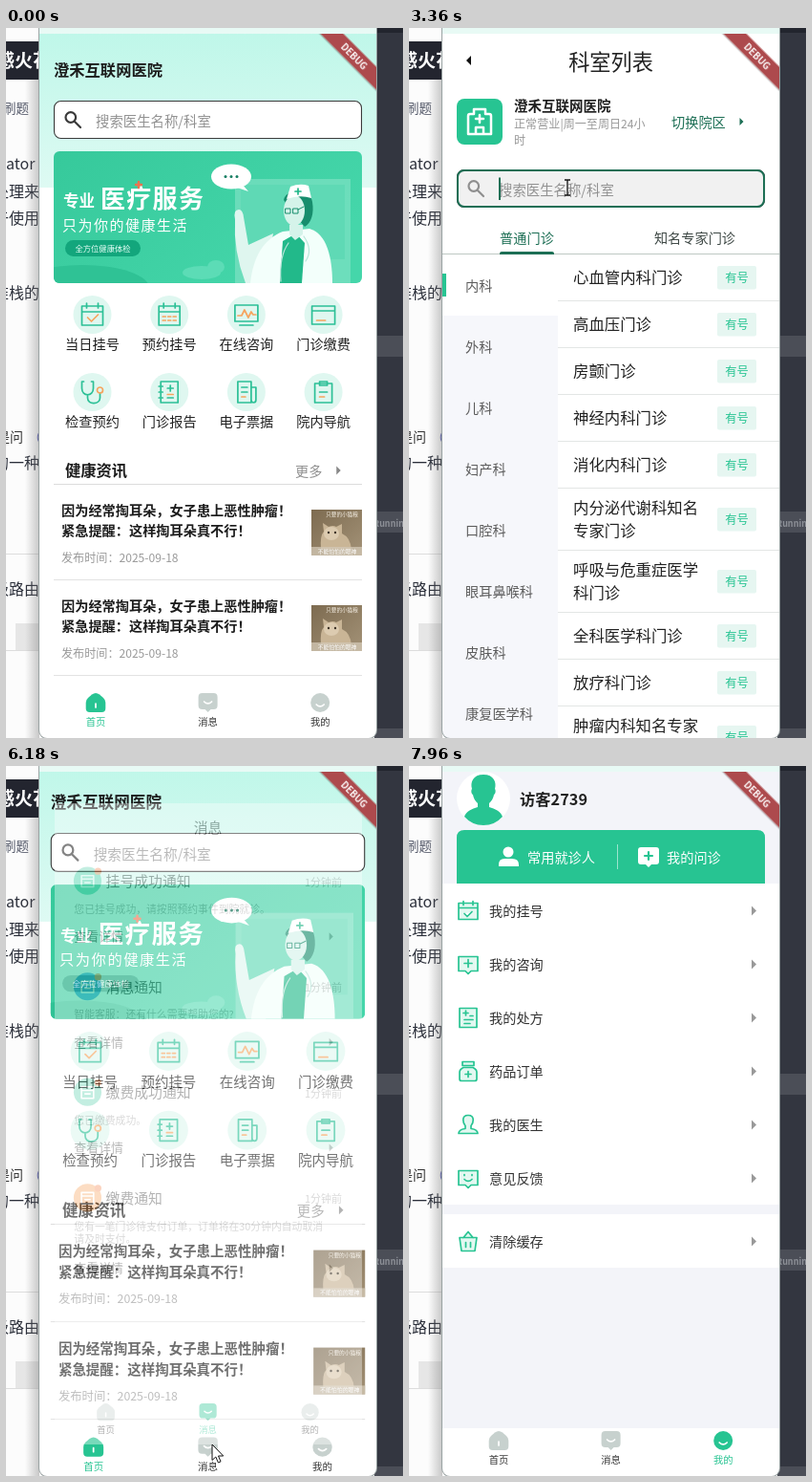
These frames come from a looping animation (416x743 px, 8 s). An HTML page:

```html
<!DOCTYPE html>
<html lang="zh-CN">
<head>
<meta charset="utf-8">
<title>互联网医院</title>
<style>
html, body { margin: 0; width: 100%; height: 100%; overflow: hidden; background: #fff; }
svg { display: block; width: 416px; height: 743px; font-family: "Noto Sans CJK SC", "Noto Sans CJK", "Noto Sans", sans-serif; }
:root { --in: cubic-bezier(.3, 0, .8, .15); --out: cubic-bezier(.05, .7, .1, 1); }
.page { transform-origin: 211.5px 374.5px; }
.page, .mouse, .step { animation-duration: 8s; animation-iteration-count: infinite; animation-timing-function: linear; }
.step { animation-timing-function: step-end; }
.ico { fill: none; stroke-width: 1.7; stroke-linejoin: round; stroke-linecap: round; }

#home { animation-name: home-zoom; }
#dept { animation-name: dept-zoom, dept-fade; }
#msg { animation-name: msg-zoom, msg-fade; }
#mine { animation-name: mine-zoom, mine-fade; }

@keyframes home-zoom {
  0%, 23.5% { transform: scale(1); animation-timing-function: var(--in); }
  25.35% { transform: scale(1.02); animation-timing-function: var(--out); }
  34.62%, 60.87% { transform: scale(1.05); }
  60.88% { transform: scale(1.1); animation-timing-function: var(--in); }
  61.91% { transform: scale(1.06); animation-timing-function: var(--out); }
  67.13%, 75.73% { transform: scale(1); animation-timing-function: var(--in); }
  77.29% { transform: scale(1.02); animation-timing-function: var(--out); }
  85.1%, 100% { transform: scale(1.05); }
}
@keyframes dept-zoom {
  0%, 23.5% { transform: scale(.85); animation-timing-function: var(--in); }
  25.35% { transform: scale(.91); animation-timing-function: var(--out); }
  34.62%, 60.88% { transform: scale(1); animation-timing-function: var(--in); }
  61.91% { transform: scale(.96); animation-timing-function: var(--out); }
  67.13%, 100% { transform: scale(.9); }
}
@keyframes dept-fade {
  0%, 25.06% { opacity: 0; }
  25.77%, 61.39% { opacity: 1; }
  62.17%, 100% { opacity: 0; }
}
@keyframes msg-zoom {
  0%, 75.73% { transform: scale(.85); animation-timing-function: var(--in); }
  77.29% { transform: scale(.91); animation-timing-function: var(--out); }
  85.1%, 87.68% { transform: scale(1); animation-timing-function: var(--in); }
  89.14% { transform: scale(1.02); animation-timing-function: var(--out); }
  96.43%, 100% { transform: scale(1.05); }
}
@keyframes msg-fade { 0%, 77.03% { opacity: 0; } 77.65%, 100% { opacity: 1; } }
@keyframes mine-zoom {
  0%, 87.68% { transform: scale(.85); animation-timing-function: var(--in); }
  89.14% { transform: scale(.91); animation-timing-function: var(--out); }
  96.43%, 100% { transform: scale(1); }
}
@keyframes mine-fade { 0%, 88.9% { opacity: 0; } 89.45%, 100% { opacity: 1; } }

.mouse { animation-name: mouse; animation-timing-function: ease-in-out; }
@keyframes mouse {
  0%, 2.25% { transform: translate(230px, 748px); }
  8.75% { transform: translate(280px, 300px); }
  12.25% { transform: translate(262px, 140px); }
  14.4% { transform: translate(250px, 98px); }
  17.5% { transform: translate(215px, 130px); }
  22.25%, 28% { transform: translate(169px, 301px); }
  33.75%, 42% { transform: translate(166px, 167px); }
  46.1%, 48.4% { transform: translate(268px, 225px); }
  49.6%, 52.5% { transform: translate(275px, 225px); }
  59.1%, 61.6% { transform: translate(67px, 36px); }
  64.37% { transform: translate(98px, 144px); }
  71.5% { transform: translate(190px, 706px); }
  73.4% { transform: translate(200px, 706px); }
  77.25% { transform: translate(216px, 710px); }
  84.4%, 91% { transform: translate(328px, 718px); }
  98.5% { transform: translate(227px, 733px); }
  99.5%, 100% { transform: translate(227px, 750px); }
}
.arrow { animation-name: arrow; }
.beam { animation-name: beam; }
.hover-home { animation-name: hover-home; }
.hover-dept { animation-name: hover-dept; }
.focus { animation-name: focus; }
.caret { animation-name: caret; }
@keyframes arrow { 0% { opacity: 1; } 13.6% { opacity: 0; } 16% { opacity: 1; } 32.4% { opacity: 0; } 43.7%, 100% { opacity: 1; } }
@keyframes beam { 0% { opacity: 0; } 13.6% { opacity: 1; } 16% { opacity: 0; } 32.4% { opacity: 1; } 43.7%, 100% { opacity: 0; } }
@keyframes hover-home { 0% { opacity: 0; } 13.6% { opacity: 1; } 16%, 100% { opacity: 0; } }
@keyframes hover-dept { 0% { opacity: 0; } 32.4% { opacity: 1; } 43.7%, 100% { opacity: 0; } }
@keyframes focus { 0% { opacity: 0; } 35.25%, 100% { opacity: 1; } }
@keyframes caret {
  0% { opacity: 0; } 35.25% { opacity: 1; } 42.4% { opacity: 0; } 48.6% { opacity: 1; }
  54.9% { opacity: 0; } 61.1%, 100% { opacity: 1; }
}
</style>
</head>
<body>
<svg viewBox="0 0 416 743">
  <defs>
    <linearGradient id="mint" x2="0" y2="1"><stop stop-color="#bff7e9"/><stop offset="1" stop-color="#defaf3"/></linearGradient>
    <linearGradient id="green" x2="1" y2=".5"><stop stop-color="#36c99b"/><stop offset="1" stop-color="#45d6aa"/></linearGradient>
    <linearGradient id="fur" x2="1" y2="1"><stop stop-color="#7d6b50"/><stop offset="1" stop-color="#a39277"/></linearGradient>
    <linearGradient id="shade"><stop stop-color="#777" stop-opacity="0"/><stop offset="1" stop-color="#777" stop-opacity=".4"/></linearGradient>
    <clipPath id="screen"><path d="M35 6H388V735a8 8 0 0 1-8 8H43a8 8 0 0 1-8-8z"/></clipPath>
    <clipPath id="hero"><rect x="50" y="129" width="323" height="138" rx="6"/></clipPath>
  </defs>
  <g id="desk"></g>
  <g clip-path="url(#screen)">
    <g id="home" class="page"></g>
    <g id="dept" class="page"></g>
    <g id="msg" class="page"></g>
    <g id="mine" class="page"></g>
    <g transform="translate(365 29.5) rotate(45)">
      <rect x="-50" y="-6" width="100" height="16" fill="#000" opacity=".14"/>
      <rect x="-50" y="-8.5" width="100" height="17" fill="#ad4a4d"/>
      <text y="3.5" font-size="9.8" font-weight="900" fill="#fff" text-anchor="middle">DEBUG</text>
    </g>
  </g>
  <g class="mouse">
    <path class="step arrow" d="M0 0V16.5L3.8 13 6.4 19 9 17.9 6.5 12H11.7z" fill="#fff" stroke="#111"/>
    <path class="step beam" d="M-3-8h2.4L0-7.4.6-8H3M0-7.4V7.4M-3 8h2.4L0 7.4.6 8H3" fill="none" stroke="#111" stroke-width="1.3"/>
  </g>
</svg>
<script>
(() => {
const GREEN = '#27c492', DARK = '#1d6f55', ORANGE = '#f6a45e';
const MID = 'text-anchor="middle"', END = 'text-anchor="end"', BOLD = 'font-weight="700"';

// y is the middle of the glyphs
const text = (x, y, size, str, fill = '#222', more = '') =>
  `<text x="${x}" y="${(y + size * .38).toFixed(2)}" font-size="${size}" fill="${fill}" ${more}>${str}</text>`;
const rect = (x, y, w, h, fill, more = '') =>
  `<rect x="${x}" y="${y}" width="${w}" height="${h}" fill="${fill}" ${more}/>`;
const disc = (x, y, r, fill, more = '') => `<circle cx="${x}" cy="${y}" r="${r}" fill="${fill}" ${more}/>`;
const oval = (x, y, rx, ry, fill, more = '') => `<ellipse cx="${x}" cy="${y}" rx="${rx}" ry="${ry}" fill="${fill}" ${more}/>`;
const path = (d, fill, more = '') => `<path d="${d}" fill="${fill}" ${more}/>`;
const icon = (x, y, d, color = GREEN, more = '') =>
  `<path class="ico" transform="translate(${x} ${y})" d="${d}" stroke="${color}" ${more}/>`;
const caretRight = (x, y, s, fill) => path(`M${x - s / 2} ${y - s}l${s} ${s}l${-s} ${s}z`, fill);
const each = (list, fn) => list.map(fn).join('');
const fillPage = (id, html) => { document.getElementById(id).innerHTML = html; };
const paper = fill => rect(35, 6, 353, 737, fill);

function nav(active) {
  const tabs = ['首页', '消息', '我的'];
  const shapes = [
    'M0-10q2 0 4 1.6l4 3.4q2.3 2 2.3 5v6q0 4-4 4h-12.6q-4 0-4-4v-6q0-3 2.3-5l4-3.4q2-1.6 4-1.6z',
    'M-6-10h12q4 0 4 4v9q0 4-4 4h-3l-3 3-3-3h-3q-4 0-4-4v-9q0-4 4-4z',
    'M-10 0a10 10 0 1 0 20 0a10 10 0 1 0-20 0z'
  ];
  const marks = ['M0 1v4', 'M-4-1q4 4 8 0', 'M-4 2q4 4 8 0'];
  return rect(35, 693, 353, 50, '#fff') + each(tabs, (tab, i) => {
    const x = 94 + i * 117.6, on = i === active;
    return path(shapes[i], on ? GREEN : '#c7d1ce', `transform="translate(${x} 706)"`) +
      icon(x, 706, marks[i], '#fff') + text(x, 726, 10.3, tab, on ? GREEN : '#333', MID);
  });
}

function search(y, ink, line, extra) {
  return rect(50.5, y + .5, 322, 39, '#fff', 'rx="7"') + extra +
    rect(50.5, y + .5, 322, 39, 'none', `rx="7" stroke="${line}" stroke-width="1.1"`) +
    icon(70, y + 20, 'M-7.5-2.5a5.3 5.3 0 1 0 10.6 0a5.3 5.3 0 1 0-10.6 0M2 2l6 6', ink, 'style="stroke-width:2.2"') +
    text(94, y + 22, 14.4, '搜索医生名称/科室', '#929292');
}

// Desktop behind the phone
const snippets = [[171, '处理来'], [199, '于使用'], [277, '堆栈的'], [455, '的一种'], [587, '级路由']];
fillPage('desk',
  rect(0, 0, 40, 743, '#fcfcfc') + rect(0, 14, 40, 40, '#23252f') + text(-10, 34, 19, '感火花', '#fff', BOLD) +
  text(-3, 84, 13.5, '刷题', '#555a6a') + text(0, 142, 16, 'ator', '#2b2f3a') +
  each(snippets, ([y, s]) => text(-13, y, 16, s, '#2b2f3a')) +
  text(-10, 428, 14, '是问', '#333') + text(23, 428, 14, '（', '#4a4fb5') +
  rect(0, 550, 35, 1, '#ddd') + rect(10, 623, 25, 28, '#e6e6e6') + rect(0, 651, 35, 1, '#ddd') +
  rect(20, 54, 15, 689, 'url(#shade)') +
  rect(386, 0, 30, 743, '#333640') + rect(386, 0, 30, 5, '#22252e') + rect(386, 322, 30, 22, '#4b4e57') +
  rect(386, 506, 30, 22, '#4b4e57') + rect(386, 733, 30, 10, '#4b4e57') + text(385, 518.5, 9, 'Running', '#8d9097', BOLD) +
  path('M34 0H389V735a9 9 0 0 1-9 9H43a9 9 0 0 1-9-9z', '#9aa3a3') + rect(35, 0, 353, 8, '#e8faf5'));

// Home
const CAL = 'M-11-9h22v20h-22zM-11-3h22M-6-12v5M6-12v5';
const services = [
  ['当日挂号', CAL, 'M-5 3l4 4 7-7'],
  ['预约挂号', CAL, 'M-7 2h3M-1.5 2h3M4 2h3M-7 6h3M-1.5 6h3M4 6h3'],
  ['在线咨询', 'M-12-10h24v17h-24zM-7 11h14', 'M-9 1h4l3-6 4 8 3-6 2 3h3'],
  ['门诊缴费', 'M-12-9h24v19h-24zM-12-4h24', 'M-7 6h9'],
  ['检查预约', 'M-9-11h-2v7c0 9 12 9 12 0v-7h-2M-5 3v3c0 8 13 7 13 0v-5', 'M5-2a3 3 0 1 0 6 0a3 3 0 1 0-6 0'],
  ['门诊报告', 'M-9-11h18v22h-18zM-11-6h4M-11 0h4M-11 6h4M1-7v6M-2-4h6M-2 6h6', 'M-2 2.5h6'],
  ['电子票据', 'M-9-11h14v22h-14zM5-5h5v13c0 4-5 4-5 0M-5-5h6M-5 0h6', 'M-5 5h4'],
  ['院内导航', 'M-9-9h18v20h-18zM-4-11h8v4h-8zM-4 0h8', 'M-4 5h5']
];

const banner = `<g clip-path="url(#hero)">` +
  rect(50, 129, 323, 138, 'url(#green)') +
  oval(80, 272, 70, 24, '#2fc295') + oval(205, 256, 20, 7, '#5cdcb6') + oval(220, 250, 9, 7, '#5cdcb6') +
  rect(240, 158, 121, 109, '#8fe6cd', 'opacity=".55"') + rect(246, 164, 52, 78, '#5fd9b5') + rect(304, 164, 51, 78, '#5fd9b5') +
  path('M240 200q-2-10 4-10 4 0 5 8l5 29 26-12-9 52h-20q-13-34-11-67z', '#dff6ef') +
  path('M256 267c3-28 14-46 34-54l28-3c18 5 24 30 24 57z', '#f3fffb') +
  path('M287 267l3-44 14-8 9 10-3 42z', '#22b98a') +
  path('M291 180c2-12 28-14 30 2 2 12-1 22-8 26l-12-14z', '#178d6d') +
  oval(302, 191, 11, 16, '#d5f3ea') + path('M297 206h14v10l-8 6-6-6z', '#d5f3ea') +
  icon(298, 189, 'M-5 0h5v5h-5zM3 0h5v5h-5zM8 1l6-3', '#178d6d', 'style="stroke-width:1"') +
  path('M294 179l4-13q10-4 19-1l3 13q-12-4-26 1z', '#fff') + icon(306, 171, 'M-3 0h6M0-3v6', '#20b688') +
  icon(314, 240, 'M-2-22q10 14 2 26M-18-15q-10 14-8 40', '#b9e6d9', 'style="stroke-width:1.2"') +
  oval(236, 155.5, 21, 13, '#fff') + path('M247 163l7 8-12-4z', '#fff') + each([230, 236, 242], x => disc(x, 155.5, 1.5, '#187f63')) +
  text(60, 181, 16.5, '专业', '#fff', BOLD) + text(99, 178.5, 26, '医疗服务', '#fff', 'font-weight="900" letter-spacing="1.3"') +
  icon(139, 164, 'M-3 0h6M0-3v6', '#f0724f', 'style="stroke-width:2.5"') +
  text(59, 206, 15, '只为你的健康生活', '#fff', 'font-weight="500" letter-spacing="1.5"') +
  rect(62, 222, 79, 17, '#13a67c', 'rx="8.5"') + text(101.5, 230.5, 8.3, '全方位健康体检', '#e8fff8', MID) + `</g>`;

const thumb = y => rect(320, y, 53, 48, 'url(#fur)') +
  path(`M330 ${y + 41}q-1-14 3-18l-1-9 6 4q5-2 8 0l6-3v10q9 4 10 17z`, '#c9b596') +
  oval(341, y + 25, 8, 7, '#dccbb0') + disc(338, y + 24, 1.2, '#3d3326') + disc(345, y + 24, 1.2, '#3d3326') +
  rect(320, y + 39, 53, 9, '#d3c8b6', 'opacity=".75"') +
  text(352, y + 5, 5.6, '只要的小猫粮', '#f5efe4', MID) + text(347, y + 43.5, 5.8, '不能怕怕的眼神', '#fff', MID);

const news = y => text(58, y + 5, 14.2, '因为经常掏耳朵，女子患上恶性肿瘤！', '#1c1c1c', BOLD) +
  text(58, y + 26, 14.2, '紧急提醒：这样掏耳朵真不行！', '#1c1c1c', BOLD) +
  text(58, y + 54, 12.1, '发布时间：2025-09-18', '#999') + thumb(y + 4) + rect(50, y + 77, 323, 1, '#e2e2e2');

fillPage('home', paper('#fff') + rect(35, 6, 353, 161, 'url(#mint)') +
  text(50, 44, 16.3, '澄禾互联网医院', '#1c1c1c', BOLD) +
  search(76, '#3a3a3a', '#3b3b3b', rect(50.5, 76.5, 322, 39, '#f1f2f2', 'class="step hover-home" rx="7"')) + banner +
  each(services, ([name, line, accent], i) => {
    const x = 90.5 + i % 4 * 80.7, y = i < 4 ? 300 : 381;
    return disc(x, y, 20, '#dff7f0') + icon(x, y, line, '#2cc096') + icon(x, y, accent, ORANGE) + text(x, y + 31, 14.2, name, '#222', MID);
  }) +
  text(62, 463, 16.3, '健康资讯', '#1c1c1c', BOLD) + text(303, 463.5, 14.2, '更多', '#8f8f8f') + caretRight(348.5, 463, 4.5, '#888') +
  rect(50, 477, 323, 1, '#dcdcdc') + news(500) + news(600) + nav(0));

// Departments
const wards = ['内科', '外科', '儿科', '妇产科', '口腔科', '眼耳鼻喉科', '皮肤科', '康复医学科'];
const clinics = [['心血管内科门诊'], ['高血压门诊'], ['房颤门诊'], ['神经内科门诊'], ['消化内科门诊'], ['内分泌代谢科知名', '专家门诊'],
  ['呼吸与危重症医学', '科门诊'], ['全科医学科门诊'], ['放疗科门诊'], ['肿瘤内科知名专家', '门诊']];
let rowTop = 237;
const clinicRows = each(clinics, lines => {
  const h = lines.length > 1 ? 65 : 49, mid = rowTop + h / 2 - .5;
  rowTop += h;
  return each(lines, (s, i) => text(172, mid + (i - (lines.length - 1) / 2) * 24, 16.4, s, '#222')) +
    rect(323, mid - 12, 41, 24.5, '#e6f6f1', 'rx="2"') + text(343.5, mid + .5, 12.3, '有号', GREEN, MID) +
    rect(156, rowTop - 1, 232, 1, '#e3e6e5');
});

fillPage('dept', paper('#fff') + path('M60 34l5-5v10z', '#111') + text(211.5, 36, 22.2, '科室列表', '#222', MID) +
  rect(50, 74, 48, 48, GREEN, 'rx="8"') +
  icon(74, 98, 'M-12 13v-19q0-2 2-2h4v-5h12v5h4q2 0 2 2v19zM-4 13v-7h8v7M-4-3h8M0-7v8', '#fff', 'style="stroke-width:2.5"') +
  text(110, 81, 14.5, '澄禾互联网医院', '#1f1f1f', BOLD) +
  text(110, 100.5, 12.1, '正常营业|周一至周日24小', '#999') + text(110, 117, 12.1, '时', '#999') +
  text(275, 99, 14.2, '切换院区', DARK) + caretRight(348.5, 98, 4, DARK) +
  search(148, '#8f8f8f', '#4a4f4d', rect(50.5, 148.5, 322, 39, '#f1f1f1', 'class="step hover-dept" rx="7"')) +
  rect(51, 149, 321, 38, 'none', `class="step focus" rx="7" stroke="${DARK}" stroke-width="2"`) +
  rect(94, 156.5, 2, 23.5, DARK, 'class="step caret"') +
  text(123.5, 220, 14.2, '普通门诊', DARK, MID) + text(299.5, 220, 14.2, '知名专家门诊', '#3f4946', MID) +
  rect(35, 237, 121, 506, '#f6f7fb') + rect(35, 237, 121, 64, '#fff') + rect(35, 257, 4, 24, GREEN) +
  each(wards, (s, i) => text(59, 270 + i * 64, 14.2, s, '#5c5c5c')) + clinicRows +
  rect(35, 236, 353, 1, '#bfc9c4') + path('M95 237v-1q0-2 2-2h53q2 0 2 2v1z', DARK));

// Messages
const notes = [
  ['挂号成功通知', '#5fd0ae', '您已挂号成功，请按照预约事件到院就诊。'],
  ['消息通知', '#3f9be3', '智能客服：还有什么需要帮助您的?'],
  ['缴费成功通知', '#5fd0ae', '您已缴费成功。'],
  ['缴费通知', ORANGE, '您有一笔门诊待支付订单，订单将在30分钟内自动取消', '请及时支付。']
];
fillPage('msg', paper('#fff') + text(211.5, 33.5, 16.3, '消息', '#222', MID) +
  each(notes, ([title, tint, ...body], i) => {
    const y = 95 + i * 121.5, last = y + 64 + (body.length - 1) * 17;
    return disc(73, y, 16, tint) + icon(73, y, 'M-7-6h14v13h-14zM-7-2h14M-3 2h6', '#fff') + disc(85, y - 11, 4, '#f58a55') +
      text(94, y + .5, 16.3, title, '#333') + text(366, y + 1.5, 12.1, '1分钟前', '#999', END) +
      each(body, (s, n) => text(57.5, y + 32.5 + n * 15, 11.9, s, '#999')) +
      text(57.5, last, 14.2, '查看详情', '#444') + caretRight(353.5, last, 4.5, '#888');
  }) + nav(1));

// Profile
const BUBBLE = 'M-10-8h20v15h-7l-3 3-3-3h-7z';
const menu = [
  ['我的挂号', 'M-10-8h20v17h-20zM-10-3h20M-5-10v4M5-10v4M-4 3l3 3 5-5'],
  ['我的咨询', BUBBLE + 'M-4-1h8M0-5v8'],
  ['我的处方', 'M-9-10h18v20h-18zM-5-5h5M-2.5-7.5v5M2-2h3M-4 2h9M-4 6h6'],
  ['药品订单', 'M-6-10h12v4h-12zM-5-4h10q4 2 4 5v7q0 2-2 2h-14q-2 0-2-2v-7q0-3 4-5zM-3 3h6M0 0v6'],
  ['我的医生', 'M0-10c8 0 5 9 3 11v3q7 1 7 5h-20q0-4 7-5v-3c-2-2-5-11 3-11z'],
  ['意见反馈', BUBBLE + 'M-4-4v1M4-4v1M-4 1q4 4 8 0'],
  ['清除缓存', 'M-9-4h18l-2 14h-14zM-5-4l5-6 5 6M-2.5 1v5M2.5 1v5']
];
fillPage('mine', paper('#f3f4f9') + disc(78, 34, 28, '#fff') +
  path('M78 9c11 0 14 8 12 15 1 1 1 5-1 6-1 5-3 7-5 9v4c6 2 12 4 14 10q-8 9-20 9t-20-9c2-6 8-8 14-10v-4c-2-2-4-4-5-9-2-1-2-5-1-6-2-7 1-15 12-15z', GREEN) +
  text(116, 35, 16.3, '访客2739', '#222', BOLD) +
  path('M50 123V75q0-8 8-8H365q8 0 8 8v48z', GREEN) +
  disc(104, 90, 5.5, '#fff') + path('M94 105v-2q0-6 6-6h8q7 0 7 6v2z', '#fff') + text(124, 96, 14.2, '常用就诊人', '#fff') +
  rect(218, 82, 1, 26, '#fff', 'opacity=".55"') +
  path('M243 85h16q3 0 3 3v12q0 3-3 3h-5l-3 3-3-3h-5q-3 0-3-3V88q0-3 3-3z', '#fff') + icon(251, 94, 'M-4 0h8M0-4v8', GREEN, 'style="stroke-width:2.2"') +
  text(270, 96, 14.2, '我的问诊', '#fff') +
  rect(35, 123, 353, 336, '#fff') + rect(35, 469, 353, 56, '#fff') +
  each(menu, ([name, line], i) => {
    const y = i < 6 ? 151.5 + i * 56 : 497.5;
    return icon(62, y, line, GREEN, 'style="fill:#e3f8f1"') + text(84, y + .5, 14.2, name, '#333') + caretRight(361.5, y, 5, '#999');
  }) + nav(2));
})();
</script>
</body>
</html>
```
